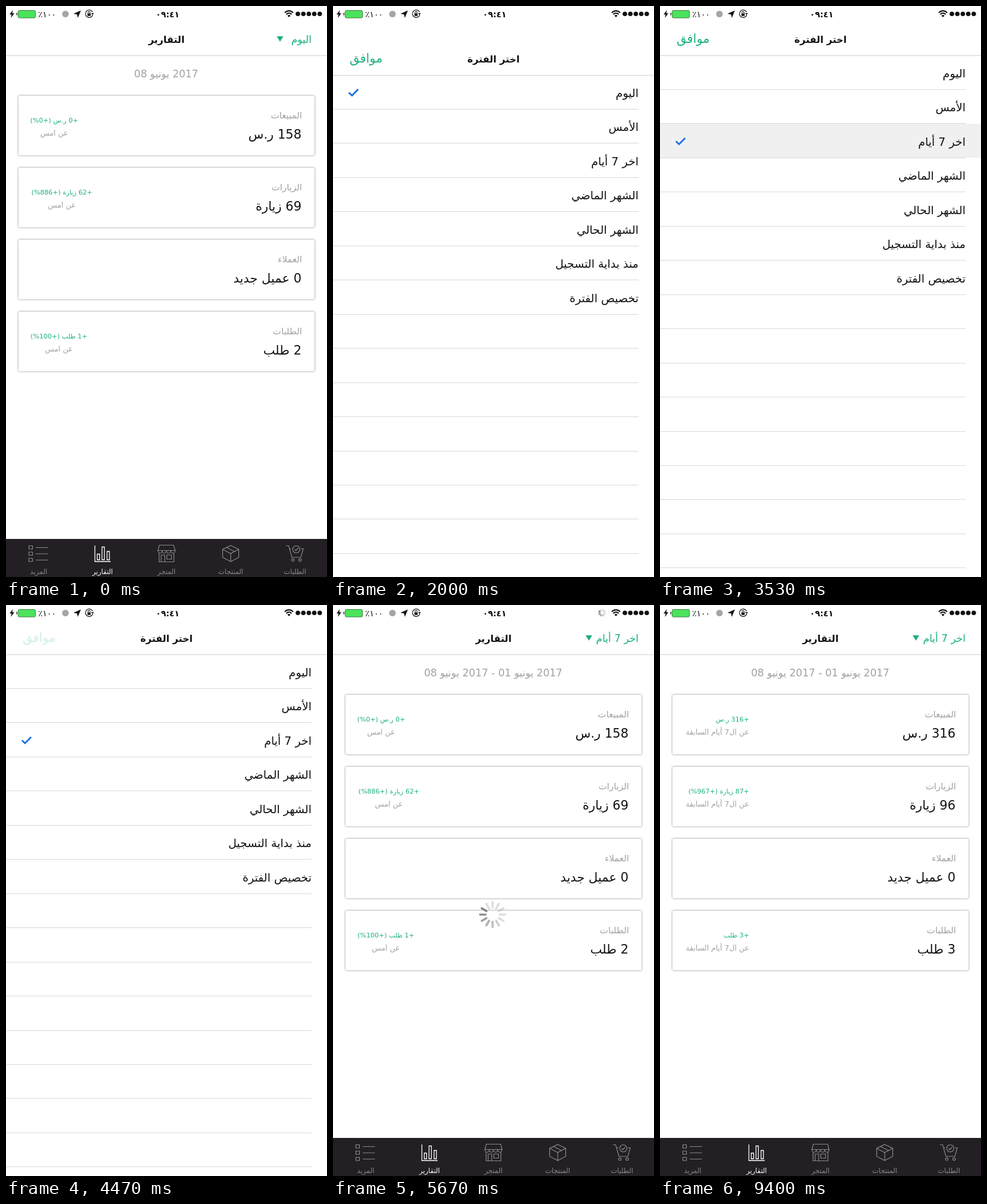
Recreate the animation shown at these times as an HTML page with a canvas. Size 540 by 960 pixels, loop 9470 ms.

```html
<!DOCTYPE html>
<html lang="ar">
<head>
<meta charset="utf-8">
<style>
html, body { margin: 0; width: 100%; height: 100%; overflow: hidden; background: #fff; }
canvas { display: block; width: 540px; height: 960px; }
</style>
</head>
<body>
<canvas id="stage" width="540" height="960"></canvas>
<script>
const ctx = document.getElementById('stage').getContext('2d');
const LOOP = 9470;
const GREEN = '#1bb07c', GREY = '#a3a1a3', BLACK = '#111';
const SLIDE = 500;
const OPEN = 1697, PICK = 3330, CONFIRM = 4470, CLOSE = 4720, LOADED = 6900;

const TAPS = [
  { x: 487, y: 57, from: 1480, to: 1800 },
  { x: 440, y: 228, from: 3100, to: 3450 },
  { x: 57, y: 57, from: 4490, to: 4830 }
];
const PERIODS = ['اليوم', 'الأمس', 'اخر 7 أيام', 'الشهر الماضي',
  'الشهر الحالي', 'منذ بداية التسجيل', 'تخصيص الفترة'];
const WEEK_NOTE = 'عن ال7 أيام السابقة', DAY_NOTE = 'عن امس';
const CARDS = [
  { label: 'المبيعات', mid: 81,
    day: ['158 ر.س', '+0 ر.س (+0\u200f%)'], week: ['316 ر.س', '+316 ر.س'] },
  { label: 'الزيارات', mid: 94,
    day: ['69 زيارة', '+62 زيارة (+886\u200f%)'], week: ['96 زيارة', '+87 زيارة (+967\u200f%)'] },
  { label: 'العملاء', mid: 0, day: ['0 عميل جديد'], week: ['0 عميل جديد'] },
  { label: 'الطلبات', mid: 89,
    day: ['2 طلب', '+1 طلب (+100\u200f%)'], week: ['3 طلب', '+3 طلب'] }
];

const clamp = v => Math.max(0, Math.min(1, v));

// Cubic Bezier easing solved by bisection.
function ease(p) {
  if (p <= 0 || p >= 1) return clamp(p);
  const curve = (a, b, u) => 3 * a * u * (1 - u) ** 2 + 3 * b * u * u * (1 - u) + u ** 3;
  let lo = 0, hi = 1;
  for (let i = 0; i < 24; i++) {
    const mid = (lo + hi) / 2;
    if (curve(0.38, 0.125, mid) < p) lo = mid; else hi = mid;
  }
  return curve(0.7, 1, lo);
}

function text(str, x, y, size, color, align = 'right', weight = '', dir = 'rtl') {
  ctx.font = `${weight} ${size}px "DejaVu Sans", sans-serif`;
  ctx.direction = dir;
  ctx.textAlign = align;
  ctx.fillStyle = color;
  ctx.fillText(str, x, y);
}

function rect(x, y, w, h, color) {
  ctx.fillStyle = color;
  ctx.fillRect(x, y, w, h);
}

function disc(x, y, r, color) {
  ctx.fillStyle = color;
  ctx.beginPath();
  ctx.arc(x, y, r, 0, 7);
  ctx.fill();
}

function fillPath(d, color) {
  ctx.fillStyle = color;
  ctx.fill(new Path2D(d));
}

function strokePath(d, color, width = 1) {
  ctx.strokeStyle = color;
  ctx.lineWidth = width;
  ctx.stroke(new Path2D(d));
}

function spinner(x, y, inner, outer, width, t, color) {
  const head = Math.floor(t / (1000 / 12)) + 2;
  ctx.save();
  ctx.translate(x, y);
  ctx.lineCap = 'round';
  ctx.lineWidth = width;
  ctx.strokeStyle = color;
  for (let i = 0; i < 12; i++) {
    const age = ((head - i) % 12 + 12) % 12;
    const angle = i * Math.PI / 6;
    ctx.globalAlpha = Math.max(0.28, 1 - age * 0.12);
    ctx.beginPath();
    ctx.moveTo(Math.sin(angle) * inner, -Math.cos(angle) * inner);
    ctx.lineTo(Math.sin(angle) * outer, -Math.cos(angle) * outer);
    ctx.stroke();
  }
  ctx.restore();
}

function statusBar(t) {
  fillPath('M11.5 7L6 14.2H9.3L8.3 20L14 12.3H10.6Z', BLACK);
  rect(17.5, 11.5, 1.6, 4, '#333');
  ctx.beginPath();
  ctx.roundRect(20.5, 7.5, 29, 12.5, 2);
  ctx.fillStyle = '#4be35c';
  ctx.fill();
  ctx.strokeStyle = '#3f7a45';
  ctx.lineWidth = 1;
  ctx.stroke();
  text('٪١٠٠', 54, 19, 14, BLACK, 'left', '', 'ltr');
  disc(100, 13.5, 5.5, '#a5a5a5');
  fillPath('M126 7.5L120.8 20L119.5 14.2L113.5 13Z', BLACK);
  strokePath('M145.7 10.2A6.3 6.3 0 1 0 146 15', BLACK, 1.2);
  fillPath('M143.2 12H148L145.6 15Z', BLACK);
  rect(137, 12.5, 5.4, 4.2, BLACK);
  strokePath('M138 12.5V11A1.7 1.7 0 0 1 141.4 11V12.5', BLACK, 1.1);
  text('٠٩:٤١', 272, 19, 14, BLACK, 'center', 'bold', 'ltr');
  if (t >= CLOSE + 200 && t < LOADED) spinner(452.5, 13, 3.4, 6, 1.2, t, '#222');
  strokePath('M468.8 11.3Q476 5 483.2 11.3M471.4 14Q476 10 480.6 14', BLACK, 2);
  fillPath('M473.4 16Q476 13.8 478.6 16L476 19Z', BLACK);
  for (let i = 0; i < 5; i++) disc(491 + i * 9.2, 13.2, 3.8, BLACK);
}

function tabBar() {
  rect(0, 896, 540, 64, '#231f24');
  const dim = '#8b888c', lit = '#fff';
  const tabs = [['المزيد', 55], ['التقارير', 162.5], ['المتجر', 270], ['المنتجات', 378], ['الطلبات', 486]];
  tabs.forEach(([name, x], i) => text(name, x, 955, 11.5, i === 1 ? lit : dim, 'center'));
  for (const y of [907.5, 918, 928.5]) {
    strokePath(`M38.5 ${y}h6v5.5h-6ZM50 ${y + 3}H70.5`, dim, 1.2);
  }
  strokePath('M149.5 907V934H176M153.5 931V921.5H157.5V931ZM161.5 931V909.5H165.5V931ZM170 931V917H174V931Z', lit, 1.3);
  strokePath('M258 906.5H282L284.5 915.5H255.5ZM255.5 915.5a3.6 4.5 0 0 0 7.2 0a3.6 4.5 0 0 0 7.2 0a3.6 4.5 0 0 0 7.2 0a3.6 4.5 0 0 0 7.2 0M257.5 920V934.5H282.5V920M261 934V923H267V934M270.5 923H278.5V930H270.5Z', dim, 1.2);
  strokePath('M378 907L391.5 913.5V927L378 934L364.5 927V913.5ZM364.5 913.5L378 920.5L391.5 913.5M378 920.5V934M371 910.5L384.5 917.2', dim, 1.2);
  strokePath('M471 907.5H475.5L481 927H496L500 912.5H496M477 912.5H480M494.3 913.5a6 6 0 1 1-12 0a6 6 0 1 1 12 0M485.5 913.5L487.6 915.8L491.3 911.5M484.7 931.5a2.2 2.2 0 1 1-4.4 0a2.2 2.2 0 1 1 4.4 0M497 931.5a2.2 2.2 0 1 1-4.4 0a2.2 2.2 0 1 1 4.4 0', dim, 1.2);
}

function card(item, i, weekly) {
  const y = 151 + i * 121;
  const [value, delta] = weekly ? item.week : item.day;
  ctx.save();
  ctx.shadowColor = 'rgba(70,30,55,.6)';
  ctx.shadowBlur = 3.5;
  ctx.fillStyle = '#fff';
  ctx.beginPath();
  ctx.roundRect(21, y, 498, 100, 2);
  ctx.fill();
  ctx.restore();
  text(item.label, 498, y + 38, 15, GREY);
  text(value, 497, y + 72, 21, BLACK);
  if (!delta) return;
  const x = weekly ? 150 : item.mid, align = weekly ? 'right' : 'center';
  text(delta, x, y + 44.5, 11, GREEN, align);
  text(weekly ? WEEK_NOTE : DAY_NOTE, x, y + 67, 12.5, GREY, align);
}

function reports(t) {
  const weekPicked = t >= CLOSE;
  text('التقارير', 270, 62, 16, BLACK, 'center', 'bold');
  text(PERIODS[weekPicked ? 2 : 0], 514, 62, 17, GREEN);
  const x = weekPicked ? 430.5 : 461;
  fillPath(`M${x - 5.5} 51H${x + 5.5}L${x} 60Z`, GREEN);
  rect(0, 83, 540, 1, '#d2d2d2');
  const span = weekPicked ? '2017 يونيو 01 - 2017 يونيو 08' : '2017 يونيو 08';
  text(span, 269.5, 119.5, 17, GREY, 'center');
  CARDS.forEach((item, i) => card(item, i, t >= LOADED));
  if (weekPicked && t < LOADED) spinner(268.5, 520.5, 12, 21, 3.6, t, '#858085');
  tabBar();
}

function periodSheet(t, offset) {
  const pitch = 57.45;
  ctx.save();
  ctx.translate(0, Math.round(offset));
  rect(0, 0, 540, 960, '#fff');
  text('اختر الفترة', 270, 62, 16, BLACK, 'center', 'bold');
  ctx.globalAlpha = t >= CONFIRM && t < CLOSE ? 0.2 : 1;
  text('موافق', 28, 62, 21, GREEN, 'left');
  ctx.globalAlpha = 1;
  rect(0, 83, 540, 1, '#d2d2d2');

  const press = t < 3200 ? 0 : 1 - clamp((t - PICK - 50) / 250);
  if (press > 0) {
    ctx.globalAlpha = press;
    rect(0, 198, 540, 57, '#d9d9d9');
    ctx.globalAlpha = 1;
  }
  PERIODS.forEach((name, i) => text(name, 514, 120 + i * pitch, 19, BLACK));
  for (let i = 0; i < 15; i++) rect(0, Math.round(140 + i * pitch), 514, 1, '#d9d9dc');

  const y = 112.5 + (t >= PICK ? 2 : 0) * pitch;
  strokePath(`M26.8 ${y}L32 ${y + 5}L42.3 ${y - 5.5}`, '#1b6fe0', 2.8);
  ctx.restore();
}

function touch({ x, y, from, to }, t) {
  if (t < from || t > to) return;
  const grow = clamp((t - from) / 100);
  const fade = clamp((to - t) / 60);
  ctx.globalAlpha = 0.62 * grow * fade;
  disc(x, y, 34.7 * (0.6 + 0.4 * grow), 'rgb(255,31,2)');
  ctx.globalAlpha = 1;
}

function draw(t) {
  rect(0, 0, 540, 960, '#fff');
  const shown = ease((t - OPEN) / SLIDE) - ease((t - CLOSE) / SLIDE);
  if (shown < 1) reports(t);
  if (shown > 0) periodSheet(t, 960 * (1 - shown));
  statusBar(t);
  TAPS.forEach(tap => touch(tap, t));
}

function tick() {
  draw(performance.now() % LOOP);
  requestAnimationFrame(tick);
}
tick();
</script>
</body>
</html>
```
